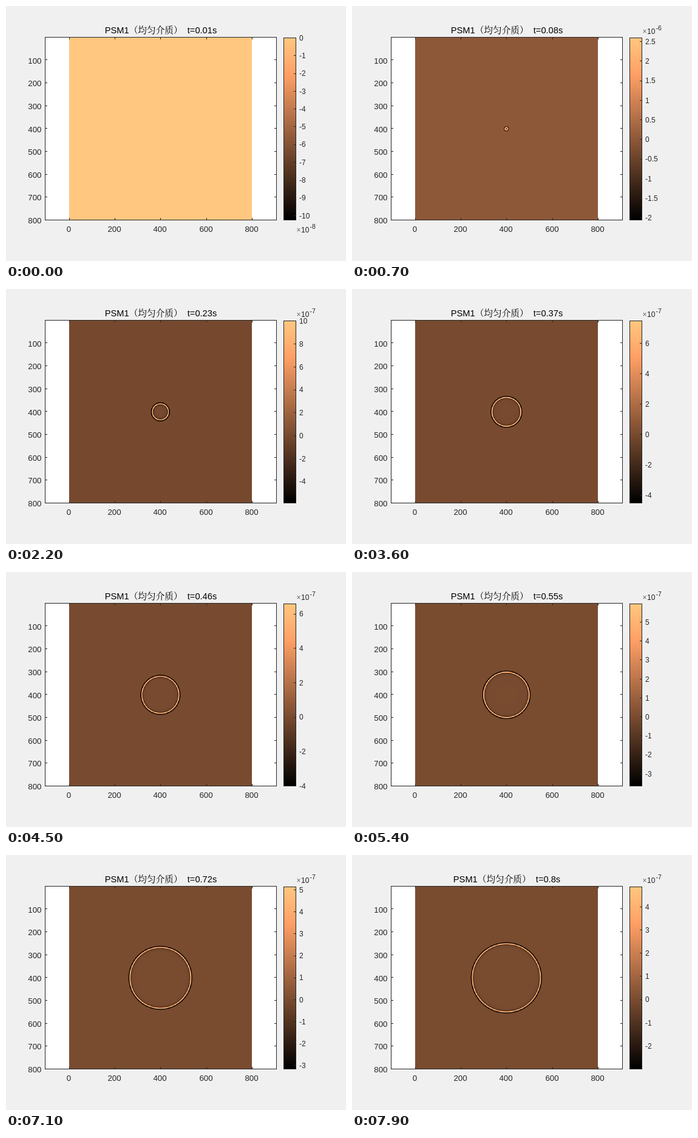
Recreate the animation shown at these times as an HTML page with a canvas. Size 560 px wide and 420 px high, loop 8000 ms.

```html
<!DOCTYPE html>
<html lang="zh">
<head>
<meta charset="utf-8">
<title>Wave field</title>
<style>
html, body { margin: 0; width: 100%; height: 100%; overflow: hidden; background: #f0f0f0; }
canvas { display: block; width: 560px; height: 420px; }
</style>
</head>
<body>
<canvas id="stage" width="560" height="420"></canvas>
<script>
const ctx = document.getElementById('stage').getContext('2d');
const FONT = '"Liberation Sans", "Noto Serif CJK SC", "Noto Sans CJK SC", "Noto Sans CJK", sans-serif';
const INK = '#262626';

// Field image, axes box and colour bar
const IMG = { x: 104, y: 52, n: 301 };
const AX = { l: 64, t: 51, r: 445, b: 352 };
const BAR = { l: 457, t: 52, w: 20, h: 300 };
const CELLS = 800;

// Wave speed in cells per second, wavelet frequency and delay
const SPEED = 200, FREQ = 20, DELAY = 0.05, LEAD = 0.0015;
const R_MIN = 0.4, R_STEP = 0.25, R_MAX = 170;
const STEP_MS = 100, STEPS = 80;

function ricker(t) {
  const a = (Math.PI * FREQ * (t - DELAY)) ** 2;
  return (1 - 2 * a) * Math.exp(-a);
}

// Point source in a uniform 2D medium, distance r, time t
function field(r, t) {
  const d = Math.max(r, R_MIN) / SPEED;
  if (t <= d) return 0;
  const from = Math.acosh(Math.max(1, (t - 2 * DELAY) / d));
  const to = Math.acosh(t / d);
  const n = 120, h = (to - from) / n;
  let sum = 0;
  for (let i = 0; i < n; i++) sum += ricker(t - d * Math.cosh(from + (i + 0.5) * h));
  return sum * h;
}

function profile(t) {
  const u = [];
  let lo = 0, hi = 0;
  for (let r = 0; r <= R_MAX; r += R_STEP) {
    const v = gain * field(r, t + LEAD);
    u.push(v);
    lo = Math.min(lo, v);
    hi = Math.max(hi, v);
  }
  return { u, lo, hi };
}

let gain = 1;
gain = 4.86e-7 / profile(0.8).hi;

function copper(x) {
  const q = Math.min(255, Math.max(0, Math.floor(x * 256))) / 255;
  return [Math.min(1, 1.25 * q), 0.7812 * q, 0.4975 * q].map(c => Math.round(c * 255));
}

function text(s, x, y, size, align = 'left', color = INK) {
  ctx.font = size + 'px ' + FONT;
  ctx.textAlign = align;
  ctx.fillStyle = color;
  ctx.fillText(s, x, y);
}

function box(x, y, w, h, color = INK) {
  ctx.fillStyle = color;
  ctx.fillRect(x, y, w, h);
}

function frameBox(l, t, r, b) {
  box(l, t, r - l + 1, 1);
  box(l, b, r - l + 1, 1);
  box(l, t, 1, b - t + 1);
  box(r, t, 1, b - t + 1);
}

const image = ctx.createImageData(IMG.n, IMG.n);

function drawField({ u, lo, hi }) {
  const scale = v => copper((v - lo) / (hi - lo));
  const colors = u.map(scale), rest = scale(0);
  const offset = [];
  for (let i = 0; i < IMG.n; i++) offset.push(Math.floor((i + 0.5) * CELLS / IMG.n) + 1 - CELLS / 2);
  let p = 0;
  for (let j = 0; j < IMG.n; j++) {
    for (let i = 0; i < IMG.n; i++) {
      const r = Math.hypot(offset[i], offset[j]);
      const c = colors[Math.round(r / R_STEP)] || rest;
      image.data[p++] = c[0];
      image.data[p++] = c[1];
      image.data[p++] = c[2];
      image.data[p++] = 255;
    }
  }
  ctx.putImageData(image, IMG.x, IMG.y);
}

function drawAxes() {
  const k = IMG.n / CELLS, len = 4;
  frameBox(AX.l, AX.t, AX.r, AX.b);
  for (let v = 0; v <= CELLS; v += 200) {
    const x = Math.round(IMG.x + (v - 0.5) * k);
    box(x, AX.t, 1, len);
    box(x, AX.b - len + 1, 1, len);
    text(v, x - 0.5, 372, 13.33, 'center');
  }
  for (let v = 100; v <= CELLS; v += 100) {
    const y = AX.t + 0.5 + (v - 0.5) * k, row = Math.min(AX.b, Math.floor(y));
    box(AX.l, row, len, 1);
    box(AX.r - len + 1, row, len, 1);
    text(v, 58.5, Math.round(y + 5.8), 13.33, 'right');
  }
}

function tickStep(range) {
  const base = 10 ** Math.floor(Math.log10(range / 10.5));
  return [1, 2, 5, 10].map(m => m * base).find(s => range / s <= 10.5);
}

function drawBar({ lo, hi }) {
  for (let i = 0; i < BAR.h; i++) {
    box(BAR.l, BAR.t + i, BAR.w, 1, `rgb(${copper(1 - (i + 0.5) / BAR.h)})`);
  }
  frameBox(BAR.l, BAR.t, BAR.l + BAR.w, BAR.t + BAR.h);

  const step = tickStep(hi - lo), eps = 1e-6;
  const first = Math.ceil(lo / step - eps), last = Math.floor(hi / step + eps);
  const top = Math.max(-first, last) * step;
  let exp = Math.floor(Math.log10(top) + eps);
  const half = Math.round(step / 10 ** Math.floor(Math.log10(step) + eps)) === 5;
  if (!half && top / 10 ** exp < 1.99) exp--;

  for (let i = first; i <= last; i++) {
    const y = BAR.t + (hi - i * step) / (hi - lo) * BAR.h;
    box(BAR.l + BAR.w - 3, Math.round(y), 3, 1);
    text(parseFloat((i * step / 10 ** exp).toFixed(1)) || 0, 483, Math.round(y + 4.8), 12);
  }

  const base = hi > 0 ? 46 : 373;
  text('×', 478.5, base, 12, 'left', '#666');
  text('10', 486, base, 12);
  text(exp, 500.5, base - 6, 10.5);
}

function draw(k) {
  const t = (k + 1) / 100;
  const wave = profile(t);
  box(0, 0, 560, 420, '#f0f0f0');
  box(AX.l, AX.t, AX.r - AX.l, AX.b - AX.t, '#fff');
  drawField(wave);
  drawAxes();
  drawBar(wave);
  text(`PSM1（均匀介质）  t=${parseFloat(t.toFixed(2))}s`, 255, 45, 14.67, 'center', '#000');
}

let shown = -1;
const start = performance.now();

function tick(now) {
  const k = Math.floor(Math.max(0, now - start) / STEP_MS) % STEPS;
  if (k !== shown) draw(shown = k);
  requestAnimationFrame(tick);
}

draw(shown = 0);
requestAnimationFrame(tick);
</script>
</body>
</html>
```
